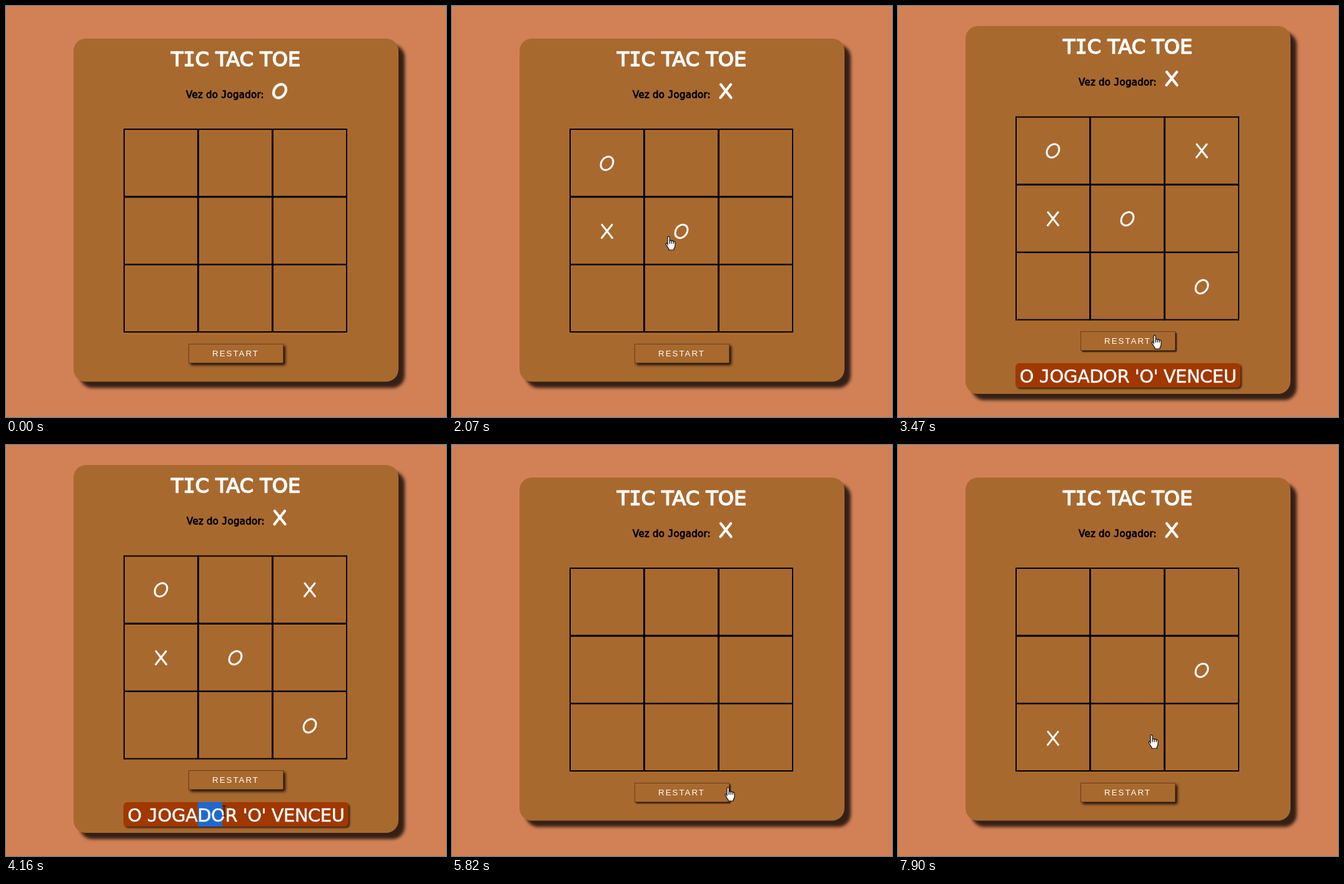
Recreate the animation shown at these times as an HTML page with a canvas. Size 704 by 657 pixels, loop 7.99 s.

```html
<!DOCTYPE html>
<html lang="pt">
<head>
<meta charset="utf-8">
<title>Tic Tac Toe</title>
<style>
  html, body { margin: 0; width: 100%; height: 100%; overflow: hidden; background: #d28156; }
  canvas { display: block; }
</style>
</head>
<body>
<canvas id="stage" width="704" height="657"></canvas>
<script>
const ctx = document.getElementById('stage').getContext('2d');
const LOOP = 7990, WIN = 3180, RESET = 5410, DRAG = 4010;
const BROWN = '#a8692f';

// cell, symbol, time placed, time cleared
const MARKS = [
  [0, 'O', 840, RESET], [3, 'X', 1610, RESET], [4, 'O', 2070, RESET],
  [2, 'X', 2640, RESET], [8, 'O', WIN, RESET],
  [6, 'X', 6580, LOOP], [5, 'O', 7520, LOOP]
];

// pointer moves: first step, last step, step count, destination
const MOVES = [
  [70, 300, 4, 305, 258], [440, 610, 3, 274, 255],
  [920, 1380, 7, 262, 377], [1690, 1770, 2, 284, 382], [1850, 1930, 2, 340, 367],
  [2300, 2380, 2, 456, 267], [2790, 2950, 3, 467, 445],
  [3250, 3470, 4, 404, 525], [3540, 3930, 6, 297, 585],
  [DRAG, 4630, 9, 505, 585], [4790, 5170, 6, 404, 538],
  [5580, 5960, 6, 451, 550], [6030, 6350, 5, 268, 498],
  [6820, 6820, 1, 289, 482], [6900, 7380, 7, 435, 386], [7670, 7900, 4, 399, 462]
];

const HAND = new Path2D('M5 15V3a1.6 1.6 0 0 1 3.2 0v6a1.5 1.5 0 0 1 3 .3a1.5 1.5 0 0 1 3 .7' +
  'a1.5 1.5 0 0 1 2.8 .8v5q0 3-2 5.5v1.7h-8v-1.7q-2-2.5-4.5-6.8q-1-2 .8-2.3q1.2 0 1.7 1.8z');
const FINGERS = new Path2D('M8.2 9v4M11.2 9.3v3.7M14.2 10v3');
const ARROW = new Path2D('M.5 .5v16l3.7-3.5l2.5 5.8l2.4-1l-2.5-5.6h5z');
const BEAM = new Path2D('M-3.5-8h3l.5 .5l.5-.5h3M0-7.5v15M-3.5 8h3l.5-.5l.5 .5h3');

function pointerAt(t) {
  let x = 633, y = 649;
  for (const [a, b, n, tx, ty] of MOVES) {
    if (t < a) break;
    const step = b > a ? Math.min(n, 1 + Math.floor((t - a) / (b - a) * (n - 1) + 1e-6)) : n;
    x += (tx - x) * step / n;
    y += (ty - y) * step / n;
  }
  return { x: Math.round(x), y: Math.round(y), hot: Math.round(x) + 6 };
}

function box(x, y, w, h, r, color, shadow) {
  ctx.save();
  if (shadow) {
    ctx.shadowOffsetX = ctx.shadowOffsetY = shadow[0];
    ctx.shadowBlur = shadow[1];
    ctx.shadowColor = shadow[2];
  }
  ctx.fillStyle = color;
  ctx.beginPath();
  ctx.roundRect(x, y, w, h, r);
  ctx.fill();
  ctx.restore();
}

// Centred lettering; I and J use the barred monospace forms.
function letter(str, cx, y, size, color, weight, spacing) {
  ctx.save();
  ctx.lineJoin = 'round';
  ctx.lineWidth = weight;
  ctx.fillStyle = ctx.strokeStyle = color;
  ctx.letterSpacing = spacing + 'px';
  const runs = str.split(/([IJ])/).filter(Boolean);
  const setFont = run => {
    ctx.font = size + (/^[IJ]$/.test(run) ? 'px "DejaVu Sans Mono", monospace' : 'px "DejaVu Sans", sans-serif');
    return ctx.measureText(run).width;
  };
  let x = cx - runs.reduce((sum, run) => sum + setFont(run), 0) / 2;
  for (const run of runs) {
    const w = setFont(run);
    ctx.fillText(run, x, y);
    if (weight) ctx.strokeText(run, x, y);
    x += w;
  }
  ctx.restore();
}

function mark(sym, x, y, weight) {
  ctx.strokeStyle = '#fff';
  ctx.lineWidth = weight;
  ctx.lineCap = 'round';
  ctx.beginPath();
  if (sym === 'O') {
    ctx.ellipse(x, y, 9, 11.6, Math.PI / 5, 0, Math.PI * 2);
  } else {
    ctx.moveTo(x - 8, y - 10.5);
    ctx.lineTo(x + 8.5, y + 10.5);
    ctx.moveTo(x + 8, y - 10.5);
    ctx.lineTo(x - 8.5, y + 10.5);
  }
  ctx.stroke();
}

function grid(top) {
  ctx.fillStyle = '#000';
  for (const [p, w] of [[188, 2], [306, 3], [425, 3], [544, 2]]) ctx.fillRect(p, top, w, 326);
  for (const [p, w] of [[0, 2], [107.5, 3], [216, 2.5], [324, 2]]) ctx.fillRect(188, top + p, 358, w);
}

function button(y, hover) {
  box(292, y, 152, 31, 2, BROWN, hover ? [2, 2, 'rgba(0,0,0,.75)'] : [3, 4, 'rgba(0,0,0,.85)']);
  ctx.strokeStyle = 'rgba(60,30,5,.55)';
  ctx.lineWidth = 1;
  ctx.strokeRect(292.5, y + .5, 151, 30);
  ctx.fillStyle = '#fff';
  ctx.font = '13.333px "Liberation Sans", Arial, sans-serif';
  ctx.letterSpacing = '2px';
  ctx.fillText('RESTART', 330, y + 20);
  ctx.letterSpacing = '0px';
}

function banner(t, hot) {
  box(188, 571, 360, 39, 6, '#a03800', [2, 3, 'rgba(0,0,0,.7)']);
  if (t >= DRAG) {
    const letters = t < 4790 ? Math.round((hot - 307) / 19.5) : 10;
    const w = Math.max(0, Math.min(10, letters)) * 19.5;
    ctx.fillStyle = '#2068d0';
    ctx.fillRect(307, 571, w, 39);
  }
  letter("O JOGADOR 'O' VENCEU", 368, 602, 29, '#fff', .5, -.5);
}

function pointer(kind, p) {
  ctx.save();
  ctx.translate(kind === 'hand' ? p.x : p.hot, p.y);
  ctx.lineCap = 'butt';
  ctx.lineJoin = 'round';
  ctx.lineWidth = 1.2;
  ctx.strokeStyle = '#111';
  ctx.fillStyle = '#fff';
  if (kind === 'beam') {
    ctx.stroke(BEAM);
  } else {
    const shape = kind === 'hand' ? HAND : ARROW;
    ctx.fill(shape);
    ctx.stroke(shape);
    if (kind === 'hand') ctx.stroke(FINGERS);
  }
  ctx.restore();
}

function draw(t) {
  const won = t >= WIN && t < RESET;
  const dy = won ? -20 : 0;
  const gridTop = won ? 176.5 : 196;
  const buttonTop = 540 + dy;
  const p = pointerAt(t);
  const inside = (x, y, w, h) => p.hot >= x && p.hot < x + w && p.y >= y && p.y < y + h;
  const overButton = inside(292, buttonTop, 152, 32);

  ctx.fillStyle = '#d28156';
  ctx.fillRect(0, 0, 704, 657);
  box(108, 52 + dy, 520, won ? 588 : 548.5, 20, BROWN, [10, 5, 'rgba(0,0,0,.75)']);

  letter('TIC TAC TOE', 367.5, 96 + dy, 32, '#fff', 1.5, 0);
  const last = MARKS.filter(m => t >= m[2] && m[2] !== WIN).pop();
  // The winning move leaves the turn on X, and a restart keeps it.
  const turn = t >= WIN && t < 6580 ? 'X' : last && last[1] === 'O' ? 'X' : 'O';
  letter('Vez do Jogador:', turn === 'X' ? 351.5 : 350.5, 147 + dy, 15, '#000', .8, .25);
  mark(turn, 438, 136 + dy, 4.3);

  grid(gridTop);
  for (const [cell, sym, from, to] of MARKS) {
    if (t >= from && t < to) {
      mark(sym, 248 + cell % 3 * 119, 251.5 + Math.floor(cell / 3) * 108.7 + dy, 3);
    }
  }

  button(buttonTop, overButton);
  if (won) banner(t, p.hot);

  if (t >= 70) {
    const kind = overButton || inside(188, gridTop, 358, 326) ? 'hand'
      : won && inside(188, 571, 360, 39) ? 'beam' : 'arrow';
    pointer(kind, p);
  }
}

const start = performance.now();
function tick() {
  draw((performance.now() - start) % LOOP);
  requestAnimationFrame(tick);
}
tick();
</script>
</body>
</html>
```
